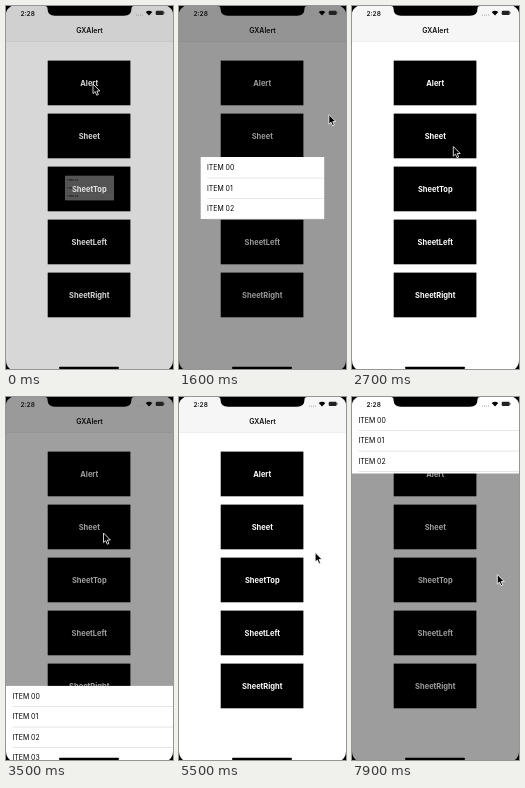
Write an HTML page that moves like this. It is 167 px wide and 363 px high and loops after 8000 ms.

```html
<!DOCTYPE html>
<html lang="en">
<head>
<meta charset="utf-8">
<title>Alert and sheet demo</title>
<style>
html, body { margin: 0; width: 100%; height: 100%; overflow: hidden; background: #fff; }
svg { display: block; width: 100vw; height: 100vh; }
text { font-family: Inter, "Liberation Sans", sans-serif; }
</style>
</head>
<body>
<svg viewBox="0 0 167 363">
  <rect width="167" height="363" fill="#fff"/>
  <rect width="167" height="35" fill="#f6f6f6"/>
  <rect y="35" width="167" height=".5" fill="#ddd"/>
  <text x="83.5" y="27.3" font-size="7" font-weight="600" text-anchor="middle" fill="#111">GXAlert</text>
  <g id="buttons" font-size="7.5" font-weight="700" text-anchor="middle" fill="#fff"></g>
  <rect id="dim" width="167" height="363"/>
  <g id="alert"><rect x="21.7" y="151" width="123.5" height="62" fill="#fff"/></g>
  <g id="bottom"><rect y="284" width="167" height="120" fill="#fff"/></g>
  <g id="top"><rect y="-40" width="167" height="119.5" fill="#fff"/></g>

  <text x="14.5" y="9.6" font-size="6.5" font-weight="600" fill="#111">2:28</text>
  <g fill="#888">
    <circle cx="130.5" cy="9" r=".5"/><circle cx="132.5" cy="9" r=".5"/>
    <circle cx="134.5" cy="9" r=".5"/><circle cx="136.5" cy="9" r=".5"/>
  </g>
  <path d="M143 9.6L139.7 6.1Q143 3.2 146.3 6.1Z"/>
  <rect x="149.7" y="4.7" width="8" height="4.2" rx="1.2" fill="#222"/>
  <rect x="158.2" y="6" width=".7" height="1.6" rx=".3" fill="#555"/>
  <path d="M39 0Q41.5 0 41.5 2.5Q41.5 9.8 49 9.8H118Q125.5 9.8 125.5 2.5Q125.5 0 128 0Z"/>
  <rect x="53" y="360.7" width="60" height="2.3" rx="1.1"/>
  <path fill-rule="evenodd" d="M0 0H167V363H0ZM0 8V354Q0 360 4 363H163Q167 360 167 354V8Q167 3 161.5 0H5.5Q0 3 0 8Z"/>
  <path id="cursor" d="M0 0V9.6L2.2 7.6L3.7 11.2L5.4 10.5L3.9 7H6.9Z" stroke="#fff" stroke-width=".8" stroke-linejoin="round"/>
</svg>
<script>
const $ = id => document.getElementById(id);
const move = (id, value) => $(id).setAttribute('transform', value);

['Alert', 'Sheet', 'SheetTop', 'SheetLeft', 'SheetRight'].forEach((label, i) => {
  const y = 54.6 + 53 * i;
  $('buttons').innerHTML += `<rect x="41.7" y="${y}" width="82.7" height="44.7" fill="#000"/>
    <text x="83.3" y="${y + 25.1}">${label}</text>`;
});

function addRows(id, count, x, right, y) {
  for (let i = 0; i < count; i++, y += 20.5)
    $(id).innerHTML += `<text x="${x}" y="${y + 12.7}" font-size="6.9">ITEM 0${i}</text>
      <rect x="${x}" y="${y + 20.2}" width="${right - x}" height=".5" fill="#ccc"/>`;
}
addRows('alert', 3, 28, 145, 151.6);
addRows('bottom', 4, 6.5, 167, 284.2);
addRows('top', 3, 6.5, 167, 16.1);

// Underdamped spring from 0 to 1, peaking about 280 ms in
function spring(ms) {
  if (ms <= 0) return 0;
  const t = ms / 1000, w = 11.2, a = 12;
  return 1 - Math.exp(-a * t) * (Math.cos(w * t) + a / w * Math.sin(w * t));
}
const shown = (t, open, close) => Math.max(0, spring(t - open) - spring(t - close));

// Cursor stops: time, x, y
const stops = [
  [1000, 87, 78], [1600, 149.9, 108.6], [2050, 149.9, 108.6], [2700, 101.3, 140.5],
  [2800, 100.5, 140], [3100, 97.5, 136], [4300, 97.5, 136], [4800, 154.3, 142],
  [5200, 154.3, 142], [6000, 97, 184.5], [6900, 97, 184.5], [7500, 145.3, 177.5]
];
function cursorAt(t) {
  const n = stops.findIndex(s => s[0] > t);
  if (n < 1) return stops[n < 0 ? stops.length - 1 : 0].slice(1);
  const [t0, x0, y0] = stops[n - 1], [t1, x1, y1] = stops[n];
  const u = (t - t0) / (t1 - t0), e = u * u * (3 - 2 * u);
  return [x0 + (x1 - x0) * e, y0 + (y1 - y0) * e];
}

function draw(now) {
  const t = Math.floor(now % 8000 / 100) * 100;
  const alert = shown(t, -74, 1930);
  const bottom = shown(t, 3320, 5130);
  const top = shown(t, 6320, 7882);
  $('dim').setAttribute('opacity', 0.4 * (alert + bottom + top));
  $('alert').setAttribute('opacity', Math.min(1, alert ** 1.2));
  move('alert', `translate(83.5 182) scale(${alert}) translate(-83.5 -182)`);
  move('bottom', `translate(0 ${79 * (1 - bottom)})`);
  move('top', `translate(0 ${79.5 * (top - 1)})`);
  move('cursor', `translate(${cursorAt(t)})`);
  requestAnimationFrame(draw);
}
draw(0);
</script>
</body>
</html>
```
